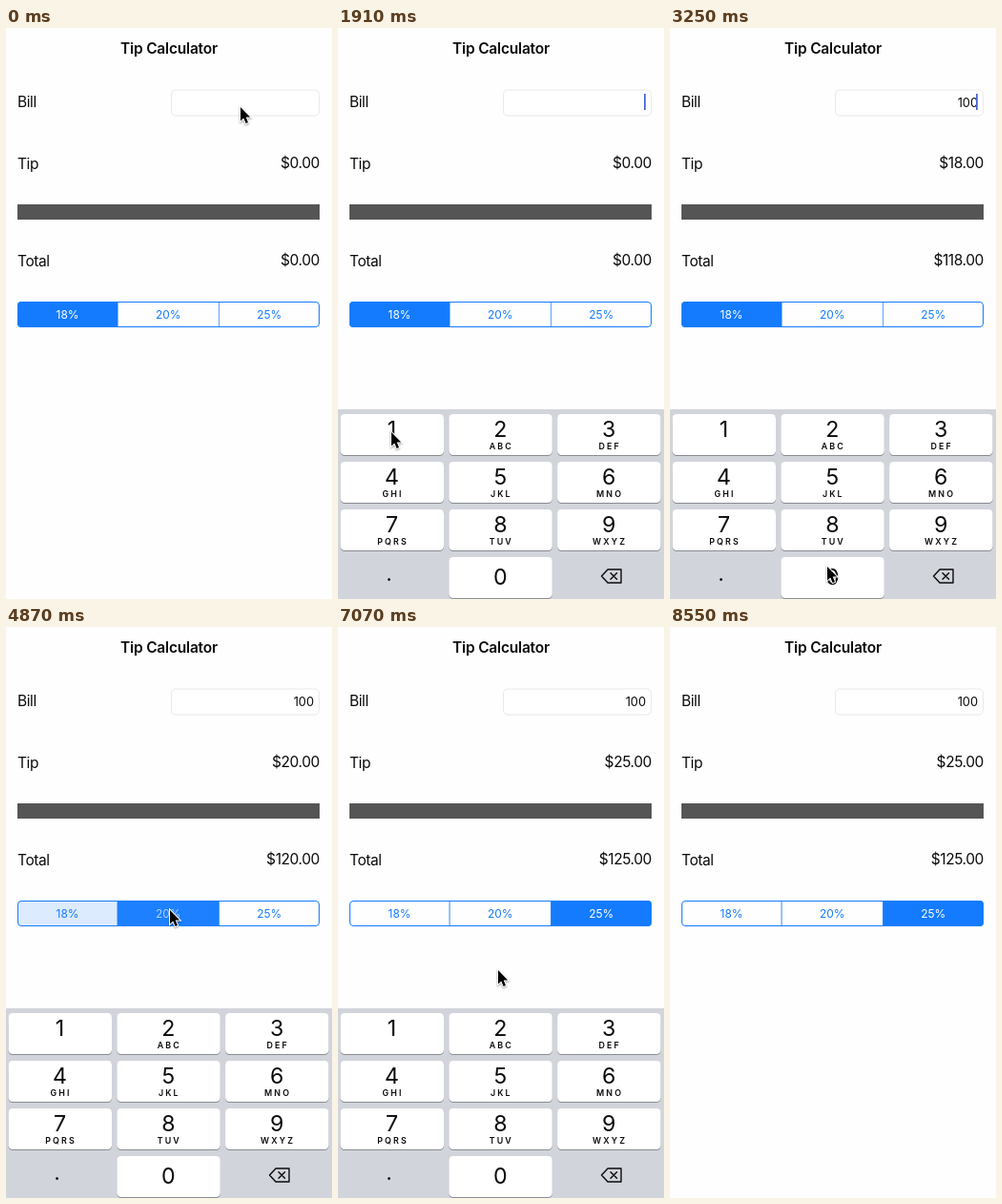
An HTML page with a canvas for the animation above (8850 ms loop, 342 by 599 pixels).

```html
<!DOCTYPE html>
<html lang="en">
<head>
<meta charset="utf-8">
<title>Tip Calculator</title>
<style>
  html, body { margin: 0; width: 100%; height: 100%; overflow: hidden; background: #fefefe; }
  canvas { display: block; width: 342px; height: 599px; }
</style>
</head>
<body>
<canvas></canvas>
<script>
const W = 342, H = 599, LOOP = 8850, STEP = 147.5;
const BLUE = '#147bff', INK = '#0a0a0a';
const canvas = document.querySelector('canvas');
const ctx = canvas.getContext('2d');
const dpr = window.devicePixelRatio || 1;
canvas.width = W * dpr;
canvas.height = H * dpr;

// Pointer way-points: step, x, y of the arrow tip
const path = [
  [0, 246, 83], [2, 246, 79], [7, 246, 79], [13, 56, 424], [15, 56, 424],
  [18, 165, 565], [23, 165, 565], [29, 172, 297], [34, 172, 297], [39, 273, 298],
  [42, 273, 298], [46, 166, 378], [48, 168, 360], [55, 168, 360], [58, 306, 625]
];
const keys = ['1', '2ABC', '3DEF', '4GHI', '5JKL', '6MNO', '7PQRS', '8TUV', '9WXYZ', '.', '0', '<'];
const arrow = [[0, 0], [0, 14.5], [3.3, 11.5], [5.6, 17], [8, 16], [5.7, 10.6], [10.2, 10.6]];

const clamp = v => Math.max(0, Math.min(1, v));
const easeOut = p => 1 - (1 - clamp(p)) ** 3;
const smooth = p => p * p * (3 - 2 * p);

function text(str, x, y, size, { align = 'left', weight = 400, color = INK, spacing = 0 } = {}) {
  ctx.font = `${weight} ${size}px Inter, sans-serif`;
  ctx.letterSpacing = spacing + 'px';
  ctx.textAlign = align;
  ctx.fillStyle = color;
  ctx.fillText(str, x, y);
}

function roundRect(x, y, w, h, r) {
  ctx.beginPath();
  ctx.roundRect(x, y, w, h, r);
}

function polygon(points) {
  ctx.beginPath();
  points.forEach(([x, y]) => ctx.lineTo(x, y));
  ctx.closePath();
}

function caretAlpha(k) {
  if (k < 5 || k > 48) return 0;
  if (k >= 13 && k <= 23) return 1;
  const dark = k < 13 ? 8.3 : 33.3;
  return clamp(0.5 - 1.2 * Math.cos((k - dark) / 6.78 * 2 * Math.PI));
}

function drawForm(k) {
  const bill = k < 15 ? '' : k < 20 ? '1' : k < 22 ? '10' : '100';
  const rate = k < 33 ? 0.18 : k < 41 ? 0.2 : 0.25;
  const label = { spacing: -0.4 }, value = { spacing: -0.4, align: 'right' };
  const money = v => '$' + v.toFixed(2);

  text('Tip Calculator', 171, 26.5, 15.5, { align: 'center', weight: 600, spacing: -0.2 });
  text('Bill', 12, 83, 15.5, label);
  text('Tip', 12, 147.5, 15.5, label);
  text('Total', 12, 249.5, 15.5, label);
  text(money(bill * rate), 329, 147, 15.5, value);
  text(money(bill * (1 + rate)), 329, 249, 15.5, value);

  roundRect(173.5, 65, 155, 27, 4.5);
  ctx.fillStyle = '#fff';
  ctx.fill();
  ctx.lineWidth = 1;
  ctx.strokeStyle = '#e8e8e8';
  ctx.stroke();
  text(bill, 323, 83, 12.8, { align: 'right' });
  ctx.globalAlpha = caretAlpha(k);
  ctx.fillStyle = '#4a68d8';
  ctx.fillRect(321, 69, 1.8, 17);
  ctx.globalAlpha = 1;

  ctx.fillStyle = '#555';
  ctx.fillRect(12, 185, 317, 16);
}

function drawSegments(k) {
  const on = s => k < s ? 0 : k === s ? 0.15 : k === s + 1 ? 0.96 : 1;
  const off = s => k < s ? 1 : k === s ? 0.14 : 0;
  const levels = [off(33), Math.min(on(32), off(41)), on(40)];
  const edges = [12, 117, 223.3, 329];

  ctx.save();
  roundRect(12, 287, 317, 27, 4);
  ctx.clip();
  levels.forEach((level, i) => {
    const x = edges[i], w = edges[i + 1] - x;
    ctx.fillStyle = BLUE;
    ctx.globalAlpha = level;
    ctx.fillRect(x, 287, w, 27);
    ctx.globalAlpha = level > 0.5 && level < 1 ? 0.65 : 1;
    text(['18%', '20%', '25%'][i], x + w / 2, 304.5, 11.9,
      { align: 'center', color: level > 0.5 ? '#fff' : BLUE });
    ctx.globalAlpha = 1;
  });
  ctx.restore();

  ctx.fillStyle = BLUE;
  ctx.fillRect(116.6, 287, 0.9, 27);
  ctx.fillRect(223, 287, 0.7, 27);
  roundRect(12.5, 287.5, 316, 26, 3.5);
  ctx.strokeStyle = BLUE;
  ctx.lineWidth = 1;
  ctx.stroke();
}

function drawBackspace(x, y) {
  ctx.strokeStyle = INK;
  ctx.lineWidth = 1.4;
  ctx.lineJoin = ctx.lineCap = 'round';
  polygon([[x, y + 7], [x + 6.5, y], [x + 20.5, y], [x + 20.5, y + 14], [x + 6.5, y + 14]]);
  ctx.moveTo(x + 9.5, y + 3.7);
  ctx.lineTo(x + 16, y + 10.3);
  ctx.moveTo(x + 16, y + 3.7);
  ctx.lineTo(x + 9.5, y + 10.3);
  ctx.stroke();
}

function drawKeyboard(k) {
  const shown = easeOut((k - 4) / 3) - smooth(clamp((k - 48) / 4));
  if (shown <= 0) return;
  const pressed = k === 14 ? '1' : k === 19 || k === 21 ? '0' : '';

  ctx.save();
  ctx.translate(0, 199 * (1 - shown));
  ctx.fillStyle = '#d1d4db';
  ctx.fillRect(0, 400, W, 200);
  keys.forEach((key, i) => {
    const x = 2.5 + 113.8 * (i % 3), y = 405 + 50 * Math.floor(i / 3), mid = x + 54;
    if (key === '.') return text('.', mid - 3, y + 175 - 150 + 0.5 - 0.5, 0.1 + 20, { align: 'center', weight: 500 });
    if (key === '<') return drawBackspace(276.5, 568);
    ctx.fillStyle = '#898c91';
    roundRect(x, y + 1, 108.5, 43, 4.5);
    ctx.fill();
    ctx.fillStyle = key[0] === pressed ? '#b9bfc9' : '#fff';
    roundRect(x, y, 108.5, 43, 4.5);
    ctx.fill();
    text(key[0], mid, y + (key === '0' ? 29 : 23.5), 23.2, { align: 'center' });
    text(key.slice(1), mid + 1, y + 36.7, 8.9, { align: 'center', weight: 600, spacing: 2.1 });
  });
  ctx.restore();
}

function drawPointer(k) {
  const i = path.findIndex(p => p[0] > k);
  if (i < 0) return;
  const [k0, x0, y0] = path[i - 1], [k1, x1, y1] = path[i];
  const p = smooth((k - k0) / (k1 - k0));
  ctx.save();
  ctx.translate(x0 + (x1 - x0) * p, y0 + (y1 - y0) * p);
  polygon(arrow);
  ctx.lineJoin = 'miter';
  ctx.lineWidth = 2;
  ctx.strokeStyle = '#fff';
  ctx.shadowColor = 'rgba(0,0,0,.4)';
  ctx.shadowBlur = 2 * dpr;
  ctx.shadowOffsetY = dpr;
  ctx.stroke();
  ctx.shadowColor = 'transparent';
  ctx.fillStyle = '#000';
  ctx.fill();
  ctx.restore();
}

function frame(now) {
  // The screen updates in even steps of about 1/7 s
  const k = Math.min(59, Math.floor((now % LOOP + 12) / STEP));
  ctx.setTransform(dpr, 0, 0, dpr, 0, 0);
  ctx.fillStyle = '#fefefe';
  ctx.fillRect(0, 0, W, H);
  drawForm(k);
  drawSegments(k);
  drawKeyboard(k);
  drawPointer(k);
  requestAnimationFrame(frame);
}
requestAnimationFrame(frame);
</script>
</body>
</html>
```
